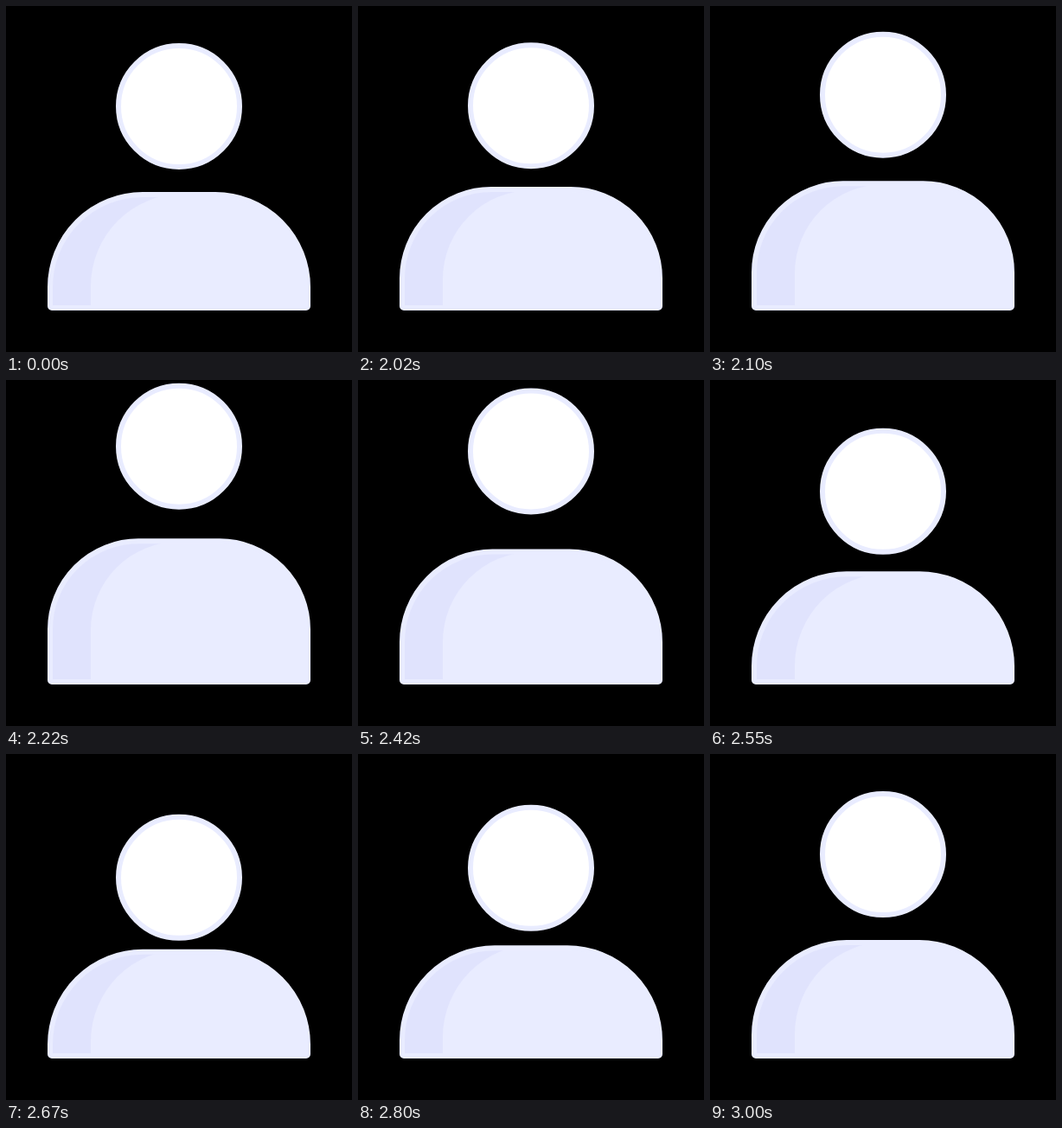
Write an HTML page with a canvas that moves like this. It is 400 px wide and 400 px high and loops after 3.02 s.

```html
<!DOCTYPE html>
<html lang="en">
<head>
<meta charset="utf-8">
<title>User icon bounce</title>
<style>
  html, body { margin: 0; width: 100%; height: 100%; overflow: hidden; background: #000; }
  canvas { display: block; width: 400px; height: 400px; }
</style>
</head>
<body>
<canvas id="stage" width="400" height="400"></canvas>
<script>
const ctx = document.getElementById('stage').getContext('2d');
const LOOP = 3020, HOLD = 2020, STEP = 25;
const LIGHT = '#e9ecff', SHADE = '#e0e3fd';

// Tracks of [seconds, value]; shade is the shadow edge's offset from the shoulder line.
const headY = [[0, 116], [.25, 75], [.368, 75], [.622, 144], [1, 116]];
const bodyTop = [[.02, 209], [.25, 182], [.31, 182], [.61, 226.5], [1, 215]];
const bodyRadius = [[.02, 103], [.25, 102], [.6, 107]];
const shadeShift = [[.02, 1], [.5, 0], [.75, -4], [1, -1]];

function at(track, s) {
  const i = track.findIndex(key => key[0] >= s);
  if (i < 0) return track[track.length - 1][1];
  if (i === 0) return track[0][1];
  const [s0, a] = track[i - 1], [s1, b] = track[i];
  const u = (s - s0) / (s1 - s0);
  return a + (b - a) * u * u * (3 - 2 * u);
}

function shoulders(left, right, top, bottom, radius) {
  const p = new Path2D();
  p.roundRect(left, top, right - left, bottom - top, [radius, radius, 2, 2]);
  return p;
}

function draw(s) {
  ctx.clearRect(0, 0, 400, 400);
  ctx.lineWidth = 6;
  ctx.strokeStyle = LIGHT;

  const top = at(bodyTop, s) + 3;
  const radius = at(bodyRadius, s);
  const body = shoulders(51, 349, top, 349, radius);
  ctx.save();
  ctx.clip(body);
  ctx.fillStyle = SHADE;
  ctx.fillRect(0, 0, 400, 400);
  ctx.fillStyle = LIGHT;
  ctx.fill(shoulders(98, 500, top + at(shadeShift, s), 360, radius));
  ctx.restore();
  ctx.stroke(body);

  ctx.beginPath();
  ctx.arc(200, at(headY, s), 70, 0, Math.PI * 2);
  ctx.fillStyle = '#fff';
  ctx.fill();
  ctx.stroke();
}

const start = performance.now();
function tick() {
  const t = (performance.now() - start) % LOOP;
  const n = Math.floor((t - HOLD) / STEP);
  draw(t < HOLD ? 1 : Math.min(1, .02 + n * STEP / 1000));
  requestAnimationFrame(tick);
}
tick();
</script>
</body>
</html>
```
